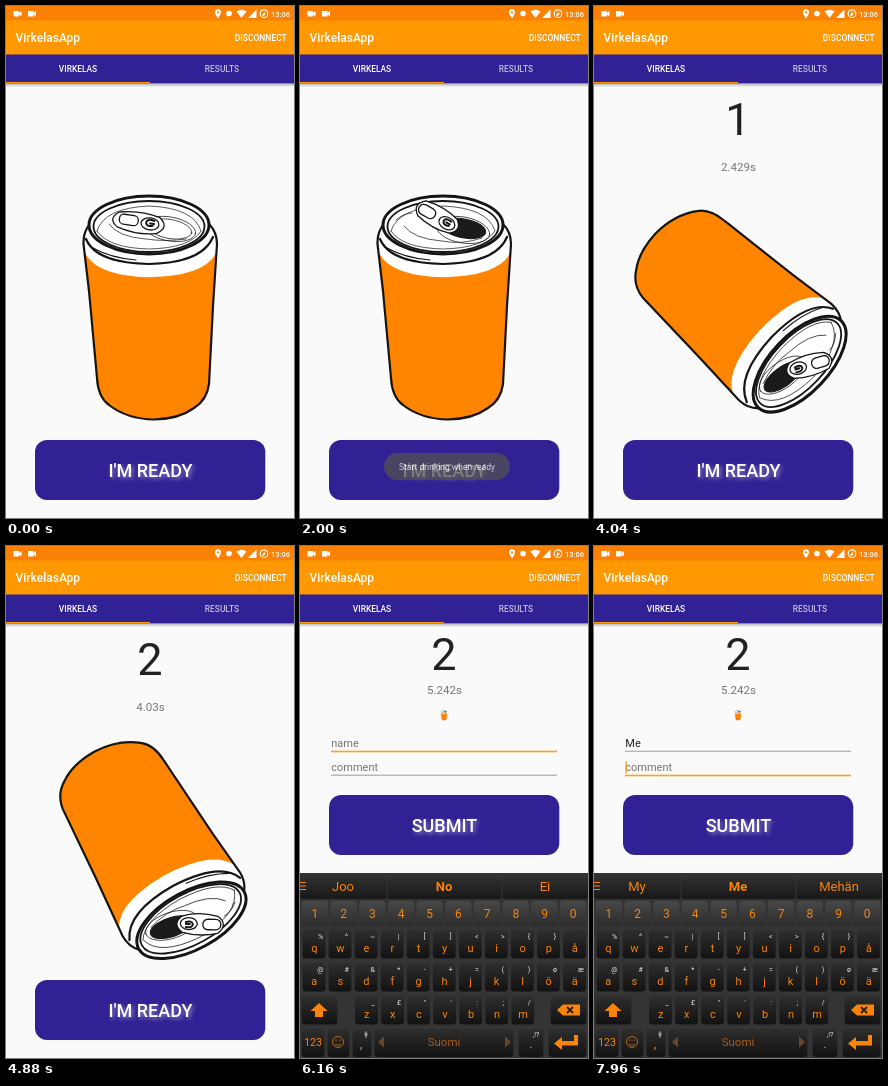
These frames come from a looping animation (288 px wide and 512 px high, 8000 ms). An HTML page:

```html
<!DOCTYPE html>
<html lang="en">
<head>
<meta charset="utf-8">
<style>
html, body { margin: 0; width: 100%; height: 100%; overflow: hidden; background: #fafafa; }
svg { display: block; width: 100%; height: 100%; font-family: Roboto, sans-serif; }
.mid { text-anchor: middle; }
.bold { font-weight: 500; }
.white { fill: #fff; }
.glow { font-size: 18px; text-shadow: 2px 2px 4px rgba(255,255,255,.45); }
.ink { fill: none; stroke: #151515; stroke-linecap: round; stroke-linejoin: round; }
.thin { stroke-width: .7; }
.paper { fill: #fff; }
</style>
</head>
<body>
<svg viewBox="0 0 288 512" preserveAspectRatio="none">
  <defs>
    <linearGradient id="barShade" x2="0" y2="1">
      <stop stop-color="#000" stop-opacity=".28"/><stop offset="1" stop-color="#000" stop-opacity="0"/>
    </linearGradient>
    <linearGradient id="letterKey" x2="0" y2="1"><stop stop-color="#2e2e2e"/><stop offset="1" stop-color="#121212"/></linearGradient>
    <linearGradient id="digitKey" x2="0" y2="1"><stop stop-color="#484848"/><stop offset="1" stop-color="#2c2c2c"/></linearGradient>
    <linearGradient id="wordKey" x2="0" y2="1"><stop stop-color="#333"/><stop offset="1" stop-color="#181818"/></linearGradient>
  </defs>

  <rect width="288" height="512" fill="#fafafa"/>

  <!-- app bar under the status bar -->
  <rect width="288" height="49" fill="#ff9801"/>
  <rect width="288" height="14.400" fill="#fb8104"/>
  <g class="white">
    <path id="camera" d="M7.500 5h5.500v2l2.500-2v5.500l-2.500-2v2h-5.500z"/>
    <use href="#camera" x="14.500"/>
    <path fill-rule="evenodd" d="M212 12.500C210 9.500 209 8 209 6.300a3 3 0 0 1 6 0C215 8 214 9.500 212 12.500zM212 5.200a1.100 1.100 0 1 0 .01 0z"/>
    <circle cx="223" cy="7.500" r="2.800"/>
    <path d="M230.500 5.500Q235.500 1.800 240.500 5.500L235.500 12z"/>
    <path d="M250.500 3.500v8.500h-8.500z"/>
    <circle cx="258" cy="7.700" r="3.800" fill="none" stroke="#fff" stroke-width="1.100"/>
    <path d="M256 9.500l2.600-4.500-.4 2.300h2l-2.800 3z"/>
    <text class="bold" x="265" y="10.500" font-size="7.500">13:06</text>
  </g>

  <!-- tabs -->
  <rect y="48.500" width="288" height="28.900" fill="#302294"/>
  <rect y="76" width="144" height="1.400" fill="#ff9801"/>
  <rect y="77.400" width="288" height="4" fill="url(#barShade)"/>
  <g class="white bold">
    <text x="9.500" y="36" font-size="12">VirkelasApp</text>
    <text x="228.800" y="34.800" font-size="8.500">DISCONNECT</text>
    <text class="mid" x="72" y="65.800" font-size="8.400">VIRKELAS</text>
    <text class="mid" x="216" y="65.800" font-size="8.400" opacity=".7">RESULTS</text>
  </g>

  <text id="count" class="mid" x="144" font-size="45" fill="#212121"></text>
  <text id="timer" class="mid" x="144.500" font-size="11.600" fill="#757575"></text>

  <!-- can, drawn around its centre (144.5, 302) -->
  <g id="can"><g transform="translate(-144.5 -302)">
    <path class="paper" d="M84 218Q77 226 77.500 238L83 285 91 372Q92 391 103 399 121 413 148 413.500 173 413 188 402 201 394 203 378L207 300 211 238Q211 226 203 218Z"/>
    <path fill="#ff8400" d="M79 247Q88 264 118 269 147 274 176 268 203 262 210 247L207 300 203 378Q201 394 188 402 173 413 148 413.500 121 413 103 399 92 391 91 372L83 285Z"/>
    <g class="ink">
      <path stroke-width="2.200" d="M84 218Q77 226 77.500 238L83 285 91 372Q92 391 103 399 121 413 148 413.500 173 413 188 402 201 394 203 378L207 300 211 238Q211 226 203 218"/>
      <path stroke-width="2.200" d="M80 233Q90 257 143 258 196 257 207 231"/>
      <path stroke-width="1.200" d="M87 242Q105 252 130 254"/>
      <ellipse class="paper" cx="143" cy="219" rx="60" ry="29" stroke-width="3"/>
      <ellipse cx="143" cy="220.500" rx="55.500" ry="25.500" stroke-width="1.800"/>
      <path class="thin" d="M91 225Q98 202 143 200 188 202 195 225Q184 242 143 243 102 242 91 225"/>
    </g>
    <g id="closedTab" class="ink">
      <ellipse class="thin" cx="164" cy="223" rx="26" ry="12" transform="rotate(10 164 223)"/>
      <ellipse class="thin" cx="164" cy="223" rx="22" ry="9.500" transform="rotate(10 164 223)"/>
      <path class="thin" d="M103 218Q112 231 140 233 160 236 180 233"/>
      <g transform="rotate(8 134 217)" stroke-width="1.300">
        <path class="paper" d="M112 209Q134 204 153 209 164 217 152 225 134 230 112 224 101 217 112 209Z"/>
        <rect x="113" y="210.500" width="19" height="10" rx="4.500"/>
        <ellipse cx="144" cy="216.500" rx="9" ry="6"/>
        <path stroke-width="2" d="M148 213Q140 211 140 216 141 220 147 218M144 216h4"/>
      </g>
    </g>
    <g id="openTab" class="ink">
      <ellipse class="thin" cx="163" cy="224" rx="27" ry="13" transform="rotate(10 163 224)"/>
      <ellipse cx="164" cy="222.500" rx="22" ry="9.500" transform="rotate(10 164 222.5)" fill="#1b1b1b"/>
      <path class="thin" d="M104 220Q114 233 142 235 162 239 182 232M96 214Q104 207 112 207"/>
      <g transform="translate(2.5 -.5) rotate(29 135 212)" stroke-width="1.300">
        <path class="paper" d="M117 203Q136 199 153 204 163 212 153 220 136 225 117 220 106 212 117 203Z"/>
        <rect x="114" y="206.500" width="18" height="10.500" rx="5"/>
        <ellipse cx="146" cy="212.500" rx="8.500" ry="6"/>
        <path stroke-width="2" d="M149 209Q142 208 142 212 143 216 149 214M145 212h4"/>
      </g>
    </g>
  </g></g>

  <!-- form, placed for the closed keyboard -->
  <g id="form">
    <g id="fields" font-size="11">
      <text id="nameText" x="31.300" y="386"></text>
      <text x="31.300" y="410" fill="#757575">comment</text>
      <rect id="nameLine" x="31" width="226"/>
      <rect id="commentLine" x="31" width="226"/>
      <rect id="caret" width="1.300" height="12" fill="#f59a1a"/>
    </g>
    <rect x="29" y="434" width="230.300" height="60" rx="12" fill="#302294"/>
    <text id="action" class="mid white bold glow" x="144.500" y="471"></text>
  </g>

  <g id="toast">
    <rect x="84" y="447" width="126" height="27" rx="13.500" fill="#505050"/>
    <text class="mid white" x="147" y="464" font-size="8.500">Start drinking when ready</text>
  </g>

  <g id="keyboard"></g>
</svg>
<script>
const $ = id => document.getElementById(id);
const clamp = (v, lo = 0, hi = 1) => Math.min(hi, Math.max(lo, v));
const LOOP = 8000, STEP = 40;
const OPENED = 720, DRINK = 2765, FORM = 5600, KEYBOARD = 6000, COMMENT = 7680;
const ORANGE = '#fb8308';

function buildKeyboard() {
  const rect = (x, y, w, h, fill, r = 3.5) =>
    `<rect x="${x}" y="${y}" width="${w}" height="${h}" rx="${r}" fill="${fill}"/>`;
  const label = (x, y, s, size = 11, fill = ORANGE, extra = '') =>
    `<text class="mid" x="${x}" y="${y}" font-size="${size}" fill="${fill}" ${extra}>${s.replace('<', '&lt;')}</text>`;
  const key = (x, y, w, h = 28.5) => rect(x + 1.6, y, w - 3.2, h, 'url(#letterKey)');
  let out = rect(0, 327, 288, 185, '#343434', 0);

  [[0, 86.5], [87.5, 114], [202.5, 85.5]].forEach(([x, w], i) => {
    out += rect(x, 328, w, 25, 'url(#wordKey)', 2);
    out += label([43, 144, 245][i], 345, '', 13, ORANGE, `id="word${i}" ${i == 1 ? 'font-weight="700"' : ''}`);
  });
  out += `<path d="M0 336.500h6M0 340h6M0 343.500h6" stroke="${ORANGE}" stroke-width="1.200"/>`;

  [...'1234567890'].forEach((c, i) => {
    const x = .5 + i * 28.7;
    out += rect(x + 1.2, 355, 26.3, 25, 'url(#digitKey)') + label(x + 14.4, 371.500, c, 12);
  });

  const rows = [
    ['qwertyuiopå', '%^~|[]<>{}', 1, 384],
    ['asdfghjklöä', '@#&*-+=()øæ', 1, 417],
    ['zxcvbnm', '_£"\':;/', 53.5, 450]
  ];
  for (const [letters, alts, left, y] of rows)
    [...letters].forEach((c, i) => {
      const x = left + i * 26.05;
      out += key(x, y, 26) + label(x + 13.3, y + 21.5, c);
      if (alts[i]) out += label(x + 19.5, y + 8.5, alts[i], 7, '#e8e8e8');
    });

  out += key(0, 450, 39) + key(249, 450, 39);
  out += `<path fill="${ORANGE}" d="M19 457l8.500 8h-4.500v6h-8v-6h-4.500z"/>`;
  out += `<path fill="${ORANGE}" d="M257 464l6-5.500h17v11h-17z"/>` +
    '<path d="M267 461l6 6M273 461l-6 6" stroke="#222" stroke-width="1.800"/>';

  [[0, 26], [26, 25], [51, 22], [73, 142], [217, 28], [247, 41]].forEach(([x, w]) => out += key(x, 483, w, 28));
  out += label(13, 500, '123', 10.5) + label(61, 502, ',', 13) + label(144, 500, 'Suomi', 11.5, '#a9591a');
  out += label(231, 502, '.', 13) + label(236, 491, ',!?', 7, '#e8e8e8');
  out += '<g fill="none" stroke="#b9651a"><circle cx="38" cy="496" r="5.500"/><path d="M35 498q3 3 6 0M36 493.500v1.500M40 493.500v1.500"/></g>';
  out += '<path d="M66 485.500v3M64.300 488q1.700 3 3.400 0M66 490v1.500" stroke="#e8e8e8" fill="none"/>';
  out += '<path fill="#6b4526" d="M84 490.500v11l-6-5.500zM205 490.500v11l6-5.500z"/>';
  out += `<path fill="${ORANGE}" d="M254 497.500l8-6.500v4h12v-6h4v10.500h-16v4.500z"/>`;
  $('keyboard').innerHTML = out;
}

// Linear interpolation through [time, value] pairs.
function track(points, t) {
  if (t <= points[0][0]) return points[0][1];
  for (let i = 1; i < points.length; i++) {
    const [t0, v0] = points[i - 1], [t1, v1] = points[i];
    if (t < t1) return v0 + (v1 - v0) * (t - t0) / (t1 - t0);
  }
  return points[points.length - 1][1];
}
const TILT = [[2520, 0], [2800, 85], [3240, 111.5], [4200, 138], [4880, 151.5], [5160, 120], [5520, 0]];
const TOAST = [[760, 0], [960, 1], [1920, 1], [2240, 0]];

const show = (id, on) => $(id).style.display = on ? '' : 'none';
function place(id, attrs) {
  for (const name in attrs) $(id).setAttribute(name, attrs[name]);
}

function render(t) {
  const form = t >= FORM, typing = t >= KEYBOARD;
  const layout = typing ? 2 : form ? 1 : 0;

  const [x, y, scale] = [[144.5, 302, 1], [146, 269, .77], [144, 169.3, .045]][layout];
  place('can', { transform: `translate(${x} ${y}) rotate(${track(TILT, t)}) scale(${scale})` });
  show('closedTab', t < OPENED);
  show('openTab', t >= OPENED);

  const seconds = clamp(.905 + (t - 3240) * 3.125 / 1640, 0, 5.242);
  $('count').textContent = t < DRINK ? '' : t < 4060 ? '1' : '2';
  $('timer').textContent = t < DRINK ? '' : +seconds.toFixed(3) + 's';
  place('count', { y: [129, 128, 124][layout] });
  place('timer', { y: [164.5, 160.3, 147.9][layout] });

  place('toast', { opacity: track(TOAST, t) });

  const typed = t < 7000 ? '' : t < 7240 ? 'M' : 'Me';
  const onComment = t >= COMMENT;
  place('form', { transform: `translate(0 ${typing ? -185 : 0})` });
  show('fields', form);
  $('action').textContent = form ? 'SUBMIT' : "I'M READY";
  $('nameText').textContent = typed || 'name';
  place('nameText', { fill: typed ? '#212121' : '#757575' });
  const active = { fill: '#fba31c', height: 1.6 }, idle = { fill: '#9a9aa6', height: 1 };
  place('nameLine', { y: 389.7, ...(onComment ? idle : active) });
  place('commentLine', { y: 413.7, ...(onComment ? active : idle) });
  place('caret', {
    x: onComment ? 31.5 : 31.5 + [0, 9.6, 15.5][typed.length],
    y: onComment ? 400.5 : 376.5
  });
  show('caret', (t - 5750) % 520 < 260);

  show('keyboard', typing);
  const rise = clamp((t - KEYBOARD + STEP) / 200);
  place('keyboard', { transform: `translate(0 ${185 * (1 - rise) ** 2})` });
  const words = typed ? ['My', 'Me', 'Mehän'] : ['Joo', 'No', 'Ei'];
  words.forEach((word, i) => $('word' + i).textContent = word);
}

function tick() {
  const t = performance.now() % LOOP;
  render(Math.floor(t / STEP) * STEP);
  requestAnimationFrame(tick);
}
buildKeyboard();
tick();
</script>
</body>
</html>
```
